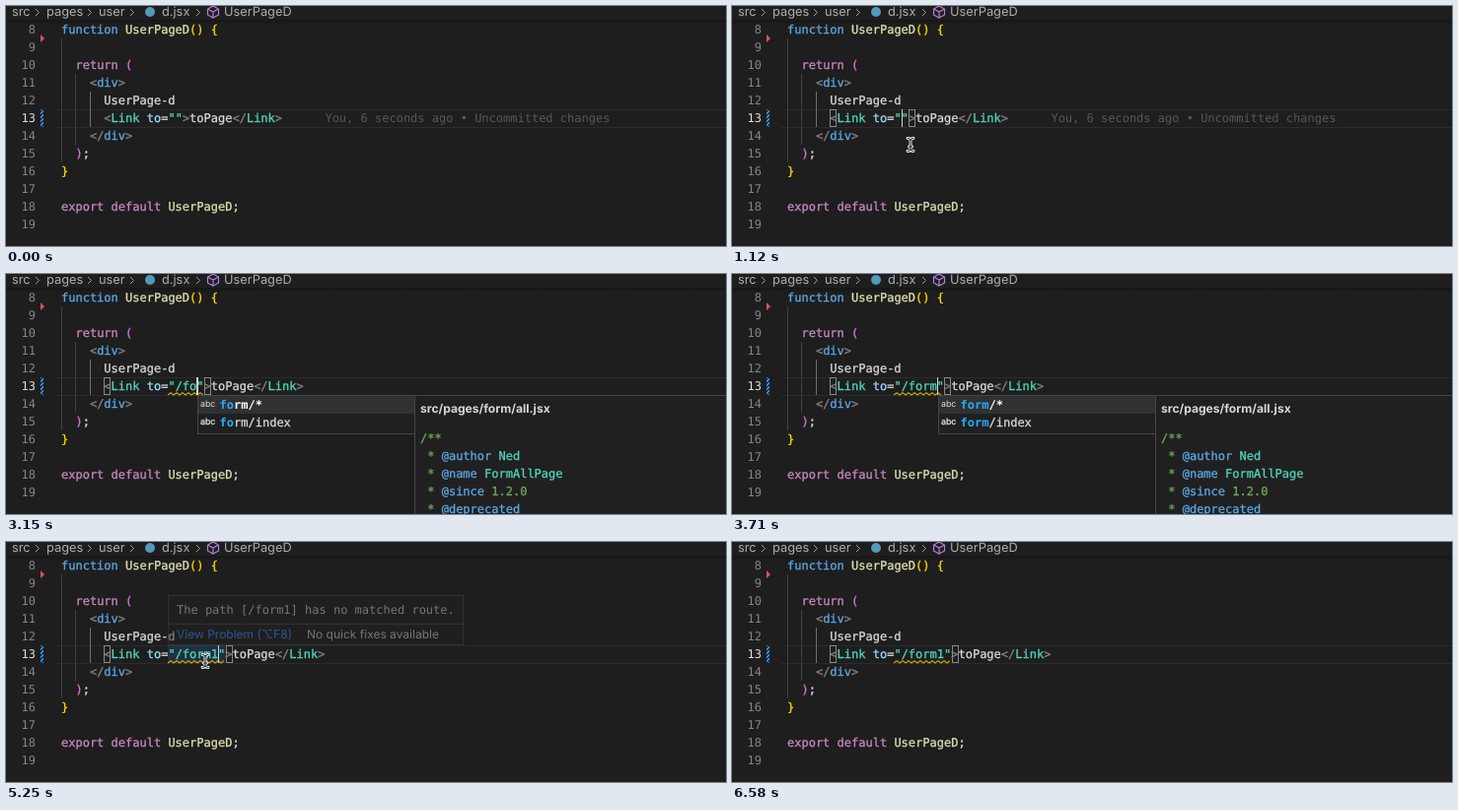
An HTML page for the animation above (6.93 s loop, 730 by 244 pixels).

```html
<!DOCTYPE html>
<html lang="en">
<head>
<meta charset="utf-8">
<title>Route completion in a code editor</title>
<style>
html, body { margin: 0; width: 100%; height: 100%; overflow: hidden; background: #1e1e1e; }
body { position: relative; text-rendering: geometricPrecision; color: #d8d8d8; }
body, pre { font: 12px/18px "DejaVu Sans Mono", monospace; }
pre { margin: 0; }
body > *, .crumb, .ui { position: absolute; }
.crumb, .ui, .icon { font-family: Inter, "DejaVu Sans", sans-serif; white-space: pre; }
.crumb { top: -2.4px; font-size: 12.8px; color: #adadad; }
svg { left: 0; top: 0; overflow: visible; }
#shadow { top: 14px; width: 100%; height: 5px; background: linear-gradient(#0004, #0000); }
#current { left: 50px; right: 0; top: 105px; height: 17px; border: solid #2b2b2b; border-width: 1px 0; }
#numbers { top: 15px; width: 30px; text-align: right; color: #858585; }
#numbers b { font-weight: 400; color: #e0e0e0; }
#diff { left: 35px; top: 105px; width: 3px; height: 18px;
  background: repeating-linear-gradient(-45deg, #3794ff 0 1.3px, #1e2f44 1.3px 2.8px); }
#code { left: 56px; top: 15px; }
/* Slightly heavier strokes, as in desktop font smoothing */
#code, #list, #docs pre { -webkit-text-stroke: .3px; }
.key { color: #5aa9e6; } .flow { color: #c988c3; } .name { color: #e0e0ae; } .gold { color: #ffd700; }
.pink { color: #da70d6; } .tag { color: #808080; } .type { color: #4fd6bb; } .attr { color: #9cdcfe; }
.note { color: #585858; -webkit-text-stroke: 0; } .doc { color: #6fa75a; }
.hit { color: #2aaaff; font-weight: 700; -webkit-text-stroke: 0; }
.bracket { top: 105px; width: 5px; height: 16px; border: 1px solid #888; }
#caret { top: 105px; width: 1.3px; height: 18px; background: #d0d0d0; }
#mark { left: 164px; top: 105px; height: 18px; background: #264f7860; }
#list, #docs, #hover { box-sizing: border-box; background: #202020; border: 1px solid #454545; }
#list { top: 123px; width: 221px; padding-bottom: 2px; }
#list div { height: 18px; padding-left: 21.6px; white-space: pre; position: relative; }
#list .on { background: #303133; color: #fff; font-weight: 700; -webkit-text-stroke: 0; }
#list .over { background: #2a2d2e; }
.icon { position: absolute; left: 2px; font-size: 8.8px; font-weight: 400; color: #e0e0e0; }
#docs { top: 123px; right: -1px; height: 130px; }
#docs .ui { left: 5px; top: 4px; font-size: 12.1px; font-weight: 700; }
#docs pre { position: absolute; left: 5px; top: 34px; right: 23px; overflow: hidden; }
#docs svg { position: absolute; left: auto; right: 5px; top: 9px; }
#hover { left: 164px; top: 54px; width: 300px; height: 51px; color: #ccc; }
#hover pre { padding: 5px 8px; }
#hover .foot { position: absolute; top: 28px; left: 0; right: 0; height: 20px; border-top: 1px solid #454545; }
#hover .ui { top: 1px; }
</style>
</head>
<body>
<span class="crumb" style="left:6px">src</span>
<span class="crumb" style="left:41px">pages</span>
<span class="crumb" style="left:94px">user</span>
<span class="crumb" style="left:158px">d.jsx</span>
<span class="crumb" style="left:221px">UserPageD</span>
<div id="shadow"></div>
<div id="current"></div>
<pre id="numbers">8
9
10
11
12
<b>13</b>
14
15
16
17
18
19</pre>
<div id="diff"></div>
<svg width="730" height="244" fill="none">
  <path stroke="#a0a0a0" d="M30 3l3.5 3.5-3.5 3.5M83 3l3.5 3.5-3.5 3.5M126 3l3.5 3.5-3.5 3.5M193 3l3.5 3.5-3.5 3.5"/>
  <circle cx="146" cy="6" r="5" fill="#519aba"/>
  <path stroke="#b180d7" stroke-width="1.2" d="M210 0l5.5 3v6l-5.5 3-5.5-3V3zM204.5 3l5.5 3 5.5-3M210 6v6"/>
  <path fill="#e05252" d="M35 29l4 4-4 4z"/>
  <path stroke="#404040" d="M56.5 33V159M70.5 69V141"/>
  <path stroke="#707070" d="M85.5 87V123"/>
</svg>
<div id="mark"></div>
<pre id="code"><span class="key">function</span> <span class="name">UserPageD</span><span class="gold">() {</span>

  <span class="flow">return</span> <span class="pink">(</span>
    <span class="tag">&lt;<span class="key">div</span>&gt;</span>
      UserPage-d
<span id="link"></span>
    <span class="tag">&lt;/<span class="key">div</span>&gt;</span>
  <span class="pink">)</span>;
<span class="gold">}</span>

<span class="flow">export default</span> <span class="name">UserPageD</span>;
</pre>
<svg width="730" height="244" fill="none"><path id="squiggle" stroke="#cca700" stroke-width="1.1"/></svg>
<div class="bracket" id="open" style="left:99px"></div>
<div class="bracket" id="close"></div>
<div id="caret"></div>
<div id="list"></div>
<div id="docs"></div>
<div id="hover">
  <pre>The path [/form1] has no matched route.</pre>
  <div class="foot">
    <span class="ui" style="left:8px;color:#3794ff">View Problem (⌥F8)</span>
    <span class="ui" style="left:140px">No quick fixes available</span>
  </div>
</div>
<svg id="mouse" width="1" height="1" fill="none" stroke-linecap="round">
  <defs><path id="ibeam" d="M-3-6.5Q0-6.5 0-4.5Q0-6.5 3-6.5M0-4.5V4.5M-3 6.5Q0 6.5 0 4.5Q0 6.5 3 6.5M-1.5 2H1.5"/></defs>
  <g id="beam"><use href="#ibeam" stroke="#fff" stroke-width="2.8"/><use href="#ibeam" stroke="#111"/></g>
</svg>
<script>
const LOOP = 6930, STEP = 70, CHAR = 7.2246;
const $ = id => document.getElementById(id);
const span = (cls, text) => `<span class="${cls}">${text}</span>`;
const colX = col => 56 + col * CHAR;
const within = (t, spans) => spans.some(([a, b]) => t >= a && t < b);
const show = (id, on) => { $(id).style.display = on ? "" : "none"; };

const typing = [[0, ""], [1960, "/"], [3010, "/f"], [3080, "/fo"], [3360, "/for"], [3570, "/form"], [3990, "/form1"]];
const caretOn = [[840, 1400], [1890, 2520], [3010, 4530], [5030, 5530], [6090, 6580]];
const routes = ["403", "account/:some", "form/*", "form/index", "link/:index?", "user", "user/b"];

// Pointer trips: time, x, y
const trips = [
  [[70, 344, 238], [350, 262, 196], [700, 175, 117], [840, 175, 117], [1120, 181, 141], [1960, 181, 141]],
  [[4130, 181, 141], [4620, 200, 124], [4900, 202, 121], [6050, 202, 121], [6230, 252, 222], [6300, 252, 222], [6580, 352, 254]]
];

function pointer(t) {
  for (const trip of trips)
    for (let i = 1; i < trip.length; i++) {
      const [t0, x0, y0] = trip[i - 1], [t1, x1, y1] = trip[i];
      if (t < t0 || t >= t1) continue;
      const k = (t - t0) / (t1 - t0);
      return [x0 + (x1 - x0) * k, y0 + (y1 - y0) * k];
    }
}

function wave(from, to) {
  let d = `M${from} 123`;
  for (let x = from + 3, up = true; x <= to; x += 3, up = !up) d += `L${x} ${up ? 120.8 : 123}`;
  return d;
}

const jsdoc = (tag, value) => span("doc", " * ") + span("key", "@" + tag) + " " + value;
const docs403 = span("ui", "src/pages/403.jsx") +
  '<svg width="8" height="8"><path stroke="#ccc" d="M0 0l8 8M8 0l-8 8"/></svg><pre class="doc">' +
  `/*${"=".repeat(11)}sagaroute-config-start${"=".repeat(7)}
// eslint-disable-next-line no-unused-vars
const routeOptions = {
  layout: false,
};</pre>`;
const docsForm = span("ui", "src/pages/form/all.jsx") + "<pre>" + [
  span("doc", "/**"), jsdoc("author", span("type", "Ned")), jsdoc("name", span("type", "FormAllPage")),
  jsdoc("since", span("doc", "1.2.0")), jsdoc("deprecated", "")].join("\n") + "</pre>";

function setText(path) {
  const end = colX(17 + path.length);
  $("link").innerHTML = "      " + span("tag", "&lt;") + span("type", "Link") + " " + span("attr", "to") + "=" +
    span("type", `"${path}"`) + span("tag", "&gt;") + "toPage" + span("tag", "&lt;/") + span("type", "Link") +
    span("tag", "&gt;") + (path ? "" : span("note", "      You, 6 seconds ago • Uncommitted changes"));
  $("close").style.left = Math.round(end + 0.5) + "px";
  $("caret").style.left = end - CHAR + "px";
  $("mark").style.width = end - 164 + "px";
  $("squiggle").setAttribute("d", wave(164, end));

  const left = Math.round(end - CHAR + 1), word = path.slice(1);
  $("list").style.left = left + "px";
  $("docs").style.left = left + 220 + "px";
  $("list").innerHTML = routes.filter(r => r.startsWith(word)).map((r, i) => {
    const cls = i == 0 ? "on" : i == 1 && !word ? "over" : "";
    return `<div class="${cls}">${span("icon", "abc")}${span("hit", word)}${r.slice(word.length)}</div>`;
  }).join("");
  $("docs").innerHTML = word ? docsForm : docs403;
}

let shown;
function frame() {
  const t = Math.floor(performance.now() % LOOP / STEP) * STEP;
  const path = typing.findLast(([at]) => t >= at)[1];
  if (path !== shown) setText(shown = path);

  const popup = within(t, [[2100, 3990]]), hover = within(t, [[5250, 6090]]);
  show("list", popup);
  show("docs", popup);
  show("hover", hover);
  show("mark", hover);
  $("hover").style.opacity = Math.min(1, 0.5 + (t - 5250) / 280);
  show("open", t >= 840);
  show("close", t >= 840);
  show("squiggle", t >= 3080);
  show("caret", within(t, caretOn));

  const at = pointer(t);
  show("mouse", at);
  if (at) $("beam").setAttribute("transform", `translate(${at})`);
  requestAnimationFrame(frame);
}
frame();
</script>
</body>
</html>
```
